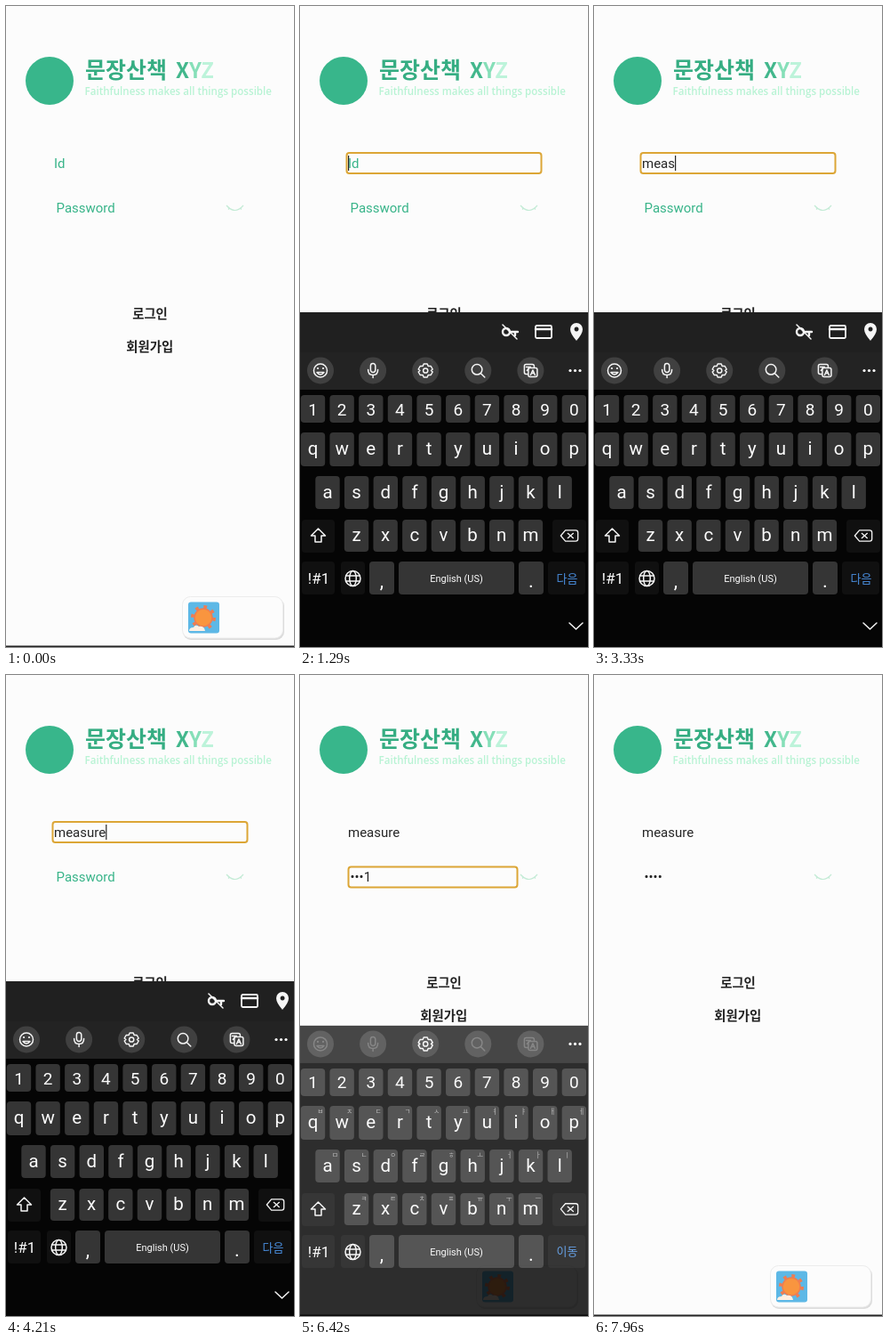
Recreate the animation shown at these times as an HTML page. Size 324x720 px, loop 8000 ms.

```html
<!DOCTYPE html>
<html lang="ko">
<head>
<meta charset="utf-8">
<title>Login</title>
<style>
html, body { margin: 0; height: 100%; overflow: hidden; background: #fcfcfc; }
svg { display: block; width: 100vw; height: 100vh; }
text { font-family: Roboto, "Noto Sans CJK KR", "Noto Sans CJK", sans-serif; white-space: pre; }
.ko { font-family: "Noto Sans CJK KR", "Noto Sans CJK", sans-serif; }
.bold { font-weight: 700; }
.tag { font-family: "Open Sans", sans-serif; font-weight: 600; }
.icon { fill: none; stroke: #f5f5f5; stroke-width: 1.5; stroke-linecap: round; stroke-linejoin: round; }
.icon .solid { fill: #f5f5f5; stroke: none; }
.muted .icon { stroke: #707070; }
.muted .disc { fill: #444; }
</style>
</head>
<body>
<svg viewBox="0 0 324 720" preserveAspectRatio="none">
  <rect width="324" height="720" fill="#fcfcfc"/>
  <circle cx="49" cy="84" r="27" fill="#38b68b"/>
  <text class="ko bold" x="89" y="81" font-size="25" fill="#35ad82">문장산책</text>
  <text class="ko bold" x="191" y="81" font-size="24"><tspan fill="#42b78c">X</tspan><tspan fill="#86dfb8">Y</tspan><tspan fill="#bdf3da">Z</tspan></text>
  <text class="tag" x="88.5" y="100" font-size="11.6" fill="#b8f3d4">Faithfulness makes all things possible</text>

  <rect id="focus" height="23" rx="3" fill="none" stroke="#dca636" stroke-width="2"/>
  <text id="user" x="54" y="181.5" font-size="15"></text>
  <text id="pass" x="56.5" y="231.5" font-size="15"></text>
  <rect id="caret" width="1.2" height="17"/>
  <path d="M248 224Q257.500 235 267 224M251 227.500l-1 1M264 227.500l1 1" fill="none" stroke="#c4ebd6" stroke-width="1.2"/>

  <g class="bold" fill="#222" text-anchor="middle" font-size="14.4">
    <text class="ko" x="162" y="351">로그인</text>
    <text class="ko" x="161.7" y="388">회원가입</text>
  </g>

  <rect x="199" y="665" width="114" height="47" rx="9" fill="#dcdcdc"/>
  <rect x="198.5" y="663.5" width="113" height="46.5" rx="9" fill="#fcfcfc" stroke="#ececec"/>
  <rect x="205" y="669.5" width="35" height="35" rx="3" fill="#5db8e6"/>
  <circle cx="222" cy="687" r="11.5" fill="none" stroke="#ef7d52" stroke-width="5" stroke-dasharray="3.5 5.53"/>
  <circle cx="222" cy="687" r="10" fill="#f9953f" stroke="#ef7d52" stroke-width="1.5"/>
  <path d="M206 702q0-4 5-4q2-4 6-1q6-1 7 5z" fill="#fff0e4"/>
  <rect y="718.5" width="324" height="1.5" fill="#222"/>

  <g id="bar">
    <rect y="344" width="324" height="45" fill="#202020"/>
    <g id="barIcons" class="icon"></g>
  </g>
  <g id="board">
    <rect y="389" width="324" height="345" fill="#050505"/>
    <rect y="389" width="324" height="42" fill="#232323"/>
    <g id="tools"></g>
    <g id="korean"></g>
    <g id="english"></g>
    <path id="chevron" class="icon" d="M303 693l7.5 7 7.5-7"/>
  </g>
  <g id="popup">
    <rect x="-25" y="-32" width="50" height="64" rx="9" fill="#2c2c2c"/>
    <text id="popupText" y="13" font-size="34" fill="#fcfcfc" text-anchor="middle"></text>
  </g>
</svg>
<script>
const $ = id => document.getElementById(id);
const LIGHT = '#fcfcfc', KEY = '#353535', DARK = '#101010', BLUE = '#4a90e2', HINT = '#828282';
const INK = '#262626', GREEN = '#38b489';
const LOOP = 8000, NAME = 'measure';
const nameTimes = [2010, 2730, 2950, 3180, 3600, 3850, 4100];
const passTimes = [5230, 5370, 5510, 5650];
const spot = {};

function add(parent, tag, attrs, text = '') {
  const el = document.createElementNS('http://www.w3.org/2000/svg', tag);
  for (const k in attrs) el.setAttribute(k, attrs[k]);
  el.textContent = text;
  parent.append(el);
  return el;
}
const label = (g, x, y, s, size, fill = LIGHT, cls = '') =>
  add(g, 'text', { x, y, 'font-size': size, fill, class: cls, 'text-anchor': 'middle' }, s);
const key = (g, x, y, width, height, fill = KEY) =>
  add(g, 'rect', { x, y, width, height, rx: 4, fill });
function icon(g, x, y, markup) {
  add(g, 'g', { class: 'icon', transform: `translate(${x} ${y})` }).innerHTML = markup;
}

const globe = '<circle r="8.5"/><ellipse rx="3.8" ry="8.5"/><path d="M-8 -3H8M-8 3H8"/>';
const erase = '<path d="M-11 0L-5 -7H8Q11 -7 11 -4V4Q11 7 8 7H-5ZM-2 -3L5 3M5 -3L-2 3"/>';
const toolIcons = [
  '<circle r="7.5"/><path d="M-4 2Q0 7 4 2Z"/><path d="M-3 -2.5h.1M3 -2.5h.1" stroke-width="2.2"/>',
  '<rect x="-2.7" y="-8" width="5.4" height="10" rx="2.7"/><path d="M-5.5 -1Q-5.5 5 0 5Q5.5 5 5.5 -1M0 5V8"/>',
  '<path d="M-2 -7.5H2L3 -5 6 -5 8 -1.5 6.3 0 8 1.5 6 5 3 5 2 7.5H-2L-3 5 -6 5 -8 1.5 -6.3 0 -8 -1.5 -6 -5 -3 -5Z"/><circle r="2.6"/>',
  '<circle cx="-1.2" cy="-1.2" r="5.8"/><path d="M3.2 3.2L7.5 7.5"/>',
  '<path d="M-3 4H-5Q-7 4 -7 2V-5Q-7 -7 -5 -7H2Q4 -7 4 -5V-4"/><rect x="-2.5" y="-3" width="10" height="10" rx="2"/><path d="M0 5L2.5 -.5 5 5M1 3H4M-5 -4H0M-4 0L-1 -4"/>'
];

function buildTools() {
  toolIcons.forEach((markup, i) => {
    const g = add($('tools'), 'g', { class: i === 2 ? '' : 'tool' });
    const x = 23 + 59.1 * i;
    add(g, 'circle', { class: 'disc', cx: x, cy: 409.5, r: 15, fill: '#404040' });
    icon(g, x, 409.5, markup);
  });
  [-5.5, 0, 5.5].forEach(d => add($('tools'), 'circle', { cx: 309.5 + d, cy: 409.5, r: 1.6, fill: LIGHT }));
  const g = $('barIcons');
  icon(g, 236, 366, '<circle cx="-4" r="4" stroke-width="2.4"/><path d="M1 0H9M6 1V4" stroke-width="2.4"/><path d="M-8 -8L8 8"/>');
  icon(g, 274, 366, '<rect x="-9" y="-7" width="18" height="14" rx="1.5" stroke-width="1.8"/><path d="M-9 -3H9" stroke-width="2.5"/>');
  icon(g, 311, 366, '<path class="solid" fill-rule="evenodd" d="M0 10Q-7 2 -7 -3A7 7 0 0 1 7 -3Q7 2 0 10ZM0 -5.5a2.5 2.5 0 1 0 .1 0Z"/>');
}

function buildKorean() {
  const g = $('korean'), cols = [1, 83.5, 165.5, 247], rows = [440, 498, 556, 613];
  const faces = ['', '', '', '', 'ㄱㅋ', 'ㄴㄹ', 'ㄷㅌ', '다음', 'ㅂㅍ', 'ㅅㅎ', 'ㅈㅊ', '.,?!', '', 'ㅇㅁ', '', ','];
  faces.forEach((s, i) => {
    const c = i % 4, r = i >> 2, x = cols[c], y = rows[r];
    if (i !== 12) key(g, x, y, 75, 50.5, c === 3 || i === 14 ? DARK : KEY);
    if (s) label(g, x + 37.5, y + 33.5, s, i === 7 ? 19.5 : 23, i === 7 ? BLUE : LIGHT, c < 3 ? 'ko' : '');
    if (c < 3 && r < 3) label(g, x + 68, y + 14, r * 3 + c + 1, 12, HINT);
  });
  label(g, 151.5, 627, '0', 12, HINT);
  add(g, 'path', { d: 'M39 458v17M192.500 466.500h20', stroke: LIGHT, 'stroke-width': 2 });
  add(g, 'circle', { cx: 121, cy: 466.5, r: 1.8, fill: LIGHT });
  icon(g, 284.5, 466, erase);
  key(g, 1, 613, 35, 50.5, DARK);
  key(g, 43, 613, 34, 50.5, DARK);
  label(g, 19, 645, '!#1', 20);
  icon(g, 59.5, 638, globe);
  label(g, 203, 636, 'KR', 11);
  add(g, 'path', { class: 'icon', d: 'M189 644v6h27v-6' });
}

function buildEnglish() {
  const g = $('english'), hints = add(g, 'g', { id: 'hints' });
  const rows = [
    ['1234567890', 14.5, 437, 31, ''],
    ['qwertyuiop', 14.5, 479, 38, 'ㅂㅈㄷㄱㅅㅛㅕㅑㅐㅔ'],
    ['asdfghjkl', 31, 528, 37, 'ㅁㄴㅇㄹㅎㅗㅓㅏㅣ'],
    ['zxcvbnm', 63.5, 577, 36, 'ㅋㅌㅊㅍㅠㅜㅡ']
  ];
  rows.forEach(([chars, x0, y, h, marks]) => [...chars].forEach((s, i) => {
    const x = x0 + 32.65 * i;
    spot[s] = [x, y + h / 2];
    key(g, x - 13.7, y, 27.4, h);
    label(g, x, y + h / 2 + (marks ? 6.3 : 7), s, marks ? 20.5 : 19);
    if (marks) label(hints, x + 8.5, y + 9, marks[i], 7.5, '#b0b0b0', 'ko');
  }));
  [[2, 577, 37], [284, 577, 38], [2, 624, 37], [46, 624, 27], [279, 624, 42]]
    .forEach(([x, y, w]) => key(g, x, y, w, 37, DARK));
  [[78, 28], [111, 130], [246, 28]].forEach(([x, w]) => key(g, x, 624, w, 37));
  icon(g, 20.5, 595, '<path d="M0 -8L8 0H3.500V7H-3.500V0H-8Z"/>');
  icon(g, 303, 595, '<g transform="scale(.88)">' + erase + '</g>');
  label(g, 21, 649, '!#1', 17);
  icon(g, 59.5, 643, globe);
  label(g, 92, 653, ',', 22);
  label(g, 176, 647, 'English (US)', 11);
  label(g, 260, 653, '.', 22);
  label(g, 300.5, 647.5, '', 13, BLUE, 'ko').id = 'action';
  g.append(hints);
}

const clamp = v => Math.max(0, Math.min(1, v));
const countBy = (times, t) => times.filter(x => x <= t).length;
const show = (id, on) => $(id).style.display = on ? '' : 'none';
const fade = (id, alpha) => { show(id, alpha > 0); $(id).setAttribute('opacity', alpha); };
const move = (id, x, y) => $(id).setAttribute('transform', `translate(${x} ${y})`);

function field(id, value, hint) {
  $(id).textContent = value || hint;
  $(id).setAttribute('fill', value ? INK : GREEN);
}

function render(t) {
  const typed = countBy(nameTimes, t), digits = countBy(passTimes, t);
  const onPass = t >= 4560, secure = t >= 4700, masked = t >= 7150;
  const user = NAME.slice(0, typed);
  const pass = digits ? '•'.repeat(digits - 1) + (masked ? '•' : '1') : '';
  field('user', user, 'Id');
  field('pass', pass, 'Password');

  const focused = t >= 230 && t < 6600;
  show('focus', focused);
  $('focus').setAttribute('x', onPass ? 54.5 : 52.5);
  $('focus').setAttribute('y', onPass ? 215.5 : 165);
  $('focus').setAttribute('width', onPass ? 190 : 219);

  const last = Math.max(...[230, 4560, ...nameTimes, ...passTimes].filter(x => x <= t));
  show('caret', focused && (t - last) % 1000 < 500);
  const box = $(onPass ? 'pass' : 'user');
  const width = (onPass ? pass : user) ? box.getComputedTextLength() : 0;
  $('caret').setAttribute('x', (onPass ? 56 : 54) + width);
  $('caret').setAttribute('y', onPass ? 218 : 168);
  $('caret').setAttribute('fill', INK);

  // The keyboard fades while it slides a short way.
  const rise = clamp((t - 330) / 200), fall = clamp((t - 6340) / 200);
  fade('board', clamp(rise * 1.5) * (1 - fall * fall));
  move('board', 0, 40 * (1 - rise) ** 2 + 30 * fall * fall);
  const slide = clamp((t - 430) / 105);
  fade('bar', slide * (1 - clamp((t - 6320) / 60)));
  move('barIcons', 21 * (1 - slide), 0);

  show('korean', t < 1200);
  show('english', t >= 1200);
  show('hints', secure);
  fade('chevron', t < 6380 ? clamp((t - 420) / 240) : 0);
  $('action').textContent = onPass ? '이동' : '다음';
  document.querySelectorAll('.tool').forEach(el => el.classList.toggle('muted', secure));

  const presses = [...nameTimes.map((at, i) => [at, NAME[i]]), ...passTimes.map(at => [at, '1'])];
  const press = presses.find(([at]) => t >= at - 40 && t < at + 75);
  show('popup', press);
  if (press) {
    const [x, y] = spot[press[1]];
    move('popup', Math.max(25, Math.min(299, x)), y - 59);
    $('popupText').textContent = press[1];
  }
}

buildTools();
buildKorean();
buildEnglish();
const start = performance.now();
function tick() {
  render((performance.now() - start) % LOOP);
  requestAnimationFrame(tick);
}
tick();
</script>
</body>
</html>
```
